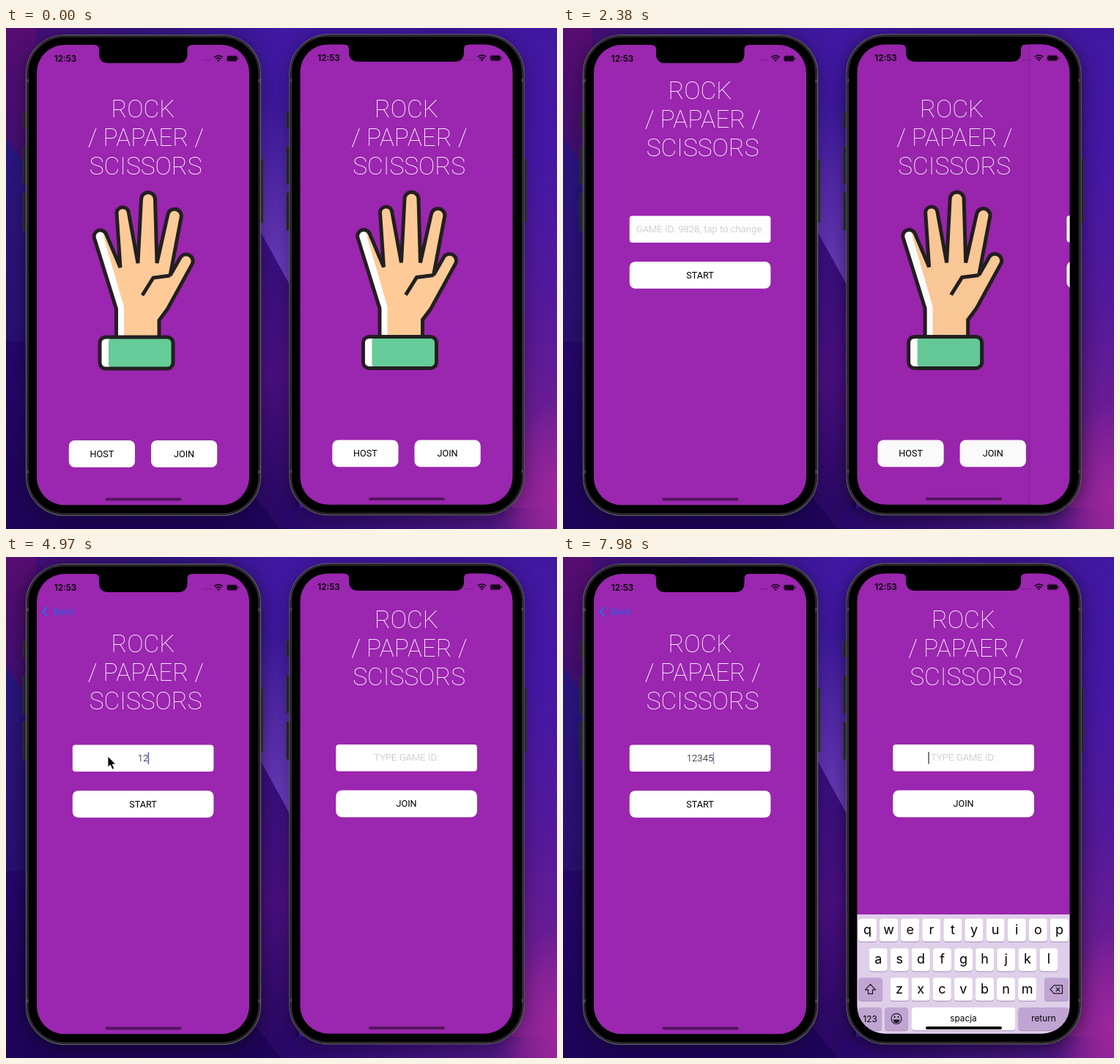
An HTML page that plays this animation: 752x684 px, repeating every 8 s.

```html
<!DOCTYPE html>
<html lang="en">
<head>
<meta charset="utf-8">
<title>Rock / Paper / Scissors</title>
<style>
html, body { margin: 0; width: 100%; height: 100%; overflow: hidden; background: #240a62; }
svg { display: block; width: 752px; height: 684px; font-family: Roboto, "Noto Sans", sans-serif; }
text { text-anchor: middle; white-space: pre; }
.title { font-size: 33.5px; font-weight: 100; fill: #fff; }
.label { font-size: 12.65px; }
.field { font-size: 13.2px; font-weight: 300; }
.hint { fill: #bdbdc2; }
.clock { font: 600 11.7px Inter, Roboto, sans-serif; }
.back { font: 400 12.2px Inter, Roboto, sans-serif; fill: #2264ea; text-anchor: start; }
.letter { font: 400 18px Inter, Roboto, sans-serif; }
.key { font: 400 11.8px Inter, Roboto, sans-serif; }
.ink { fill: none; stroke: #231f20; stroke-width: 5; }
.icon { fill: none; stroke: #1a1420; stroke-width: 1.2; stroke-linejoin: round; stroke-linecap: round; }
</style>
</head>
<body>
<svg id="stage" viewBox="0 0 752 684"></svg>
<script>
const LOOP = 8000, STEP = 70, WIDTH = 290;
const PURPLE = '#9b26af';
const HAND = 'M150.5 423V383.5L120.4 286.5A8.6 8.6 0 0 1 136.6 281L156 327L151 252A8.3 8.3 0 0 1 167 250' +
  'L180 321L184.5 234A9.5 9.5 0 0 1 203.5 234L206 321L221 254A9.3 9.3 0 0 1 239 259' +
  'L224 338L238.2 313A9.2 9.2 0 0 1 253.4 323.5L220.5 383.5L209 399V423';

const rect = (x, y, w, h, r, fill, more = '') =>
  `<rect x="${x}" y="${y}" width="${w}" height="${h}" rx="${r}" fill="${fill}" ${more}/>`;
const text = (cls, x, y, s, more = '') => `<text class="${cls}" x="${x}" y="${y}" ${more}>${s}</text>`;
const poly = (points, fill) => `<polygon points="${points}" fill="${fill}"/>`;
const path = (d, more) => `<path d="${d}" ${more}/>`;
const gradient = (id, dir, ...stops) => `<linearGradient id="${id}" ${dir}>` +
  stops.map(([o, c, a = 1]) => `<stop offset="${o}" stop-color="${c}" stop-opacity="${a}"/>`).join('') +
  '</linearGradient>';

const defs = `<defs>
  ${gradient('sky', '', [0, '#470d74'], [.25, '#33157f'], [.5, '#4018a2'], [.8, '#3d169a'], [1, '#4417a0'])}
  ${gradient('dusk', 'x2="0" y2="1"', [0, '#560d70'], [1, '#3d0f70'])}
  ${gradient('slope', 'x2="0" y2="1"', [0, '#2a1680'], [1, '#28106e'])}
  ${gradient('facet', 'x2="0" y2="1"', [0, '#3d189c'], [1, '#7040bd'])}
  ${gradient('low', 'x2="0" y2="1"', [0, '#25076a'], [1, '#1e0457'])}
  ${gradient('mid', 'x2="0" y2="1"', [0, '#35107f'], [.5, '#4a1080'], [1, '#260862'])}
  ${gradient('side', 'x2="0" y2="1"', [0, '#4217a0'], [.25, '#4417a4'], [.55, '#53199a'], [.8, '#6d1d92'], [1, '#82208f'])}
  ${gradient('floor', '', [0, '#28086a'], [.75, '#4a1680'], [1, '#82208f'])}
  ${gradient('edge', '', [0, '#000', 0], [1, '#000', .07])}
  <radialGradient id="glow"><stop stop-color="#9c279c"/><stop offset="1" stop-color="#9c279c" stop-opacity="0"/></radialGradient>
  <filter id="blur" x="-30%" y="-30%" width="160%" height="160%"><feGaussianBlur stdDeviation="13"/></filter>
  <clipPath id="screen">${rect(42, 23, WIDTH, 628.3, 38, '#000')}</clipPath>
  <clipPath id="skin">${path(HAND, '')}</clipPath>
</defs>`;

const wallpaper =
  rect(0, 0, 752, 684, 0, 'url(#sky)') +
  poly('0,0 40,0 40,205 0,150', 'url(#dusk)') +
  poly('0,150 40,205 40,442 0,428', 'url(#slope)') +
  poly('0,428 400,440 400,684 0,684', 'url(#low)') +
  poly('340,100 395,100 395,365 340,265', 'url(#facet)') +
  poly('340,265 395,365 395,684 375,684 340,640', 'url(#mid)') +
  rect(690, 0, 62, 684, 0, 'url(#side)') +
  rect(380, 655, 372, 29, 0, 'url(#floor)') +
  '<ellipse cx="752" cy="640" rx="75" ry="130" fill="url(#glow)"/>';

const title = y => text('title', 187, y, 'ROCK') +
  text('title', 190.8, y + 39, '/ PAPAER /') + text('title', 190.6, y + 78, 'SCISSORS');

const hand = path(HAND, 'fill="#fecb98"') +
  `<g clip-path="url(#skin)">${poly('110,270 130,270 134,288 161,381 161,425 145,425 145,384', '#fff')}</g>` +
  path(HAND, 'class="ink" stroke-miterlimit="2"') +
  path('M224 338L201 341L186 365', 'class="ink"') +
  rect(128, 422, 100, 43, 8, '#fff') + rect(140, 423, 87, 41, 5, '#66cc99') +
  rect(128, 422, 100, 43, 8, 'none', 'stroke="#231f20" stroke-width="5"');

const backdrop = rect(41, 22, WIDTH + 2, 631, 0, PURPLE);
const button = (x, y, w, label) => rect(x, y, w, 36.8, 8, '#fff') +
  text('label', x + w / 2, y + 23, label);

const home = backdrop + title(122.3) + hand +
  button(85.8, 563, 90.2, 'HOST') + button(198, 563, 90.2, 'JOIN');

const form = (id, hint, action) => backdrop +
  rect(35, 22, 6, 631, 0, 'url(#edge)') +
  `<g id="${id}Title">${title(97.3)}</g>` +
  rect(90.8, 256.5, 192.6, 36.5, 4, '#fff') +
  text('field hint', 187, 279, hint, `id="${id}Hint"`) +
  text('field', 187, 279, '', `id="${id}Value"`) +
  button(90.8, 319, 192.6, action) +
  `<g id="${id}Back" visibility="hidden">` +
  path('M56.5 68L50.5 74.5L56.5 81', 'fill="none" stroke="#0a7aff" stroke-width="1.8"') +
  text('back', 64.5, 79, 'Back') + '</g>' +
  rect(-.7, 266.5, 1.4, 16.5, .5, id === 'host' ? '#4b50d8' : '#4a4650', `id="${id}Caret" opacity="0"`);

const status = text('clock', 81, 45.5, '12:53') +
  [269, 272.3, 275.6, 278.9].map(x => rect(x - 1, 43, 1.8, 1.8, .9, '#6d1c7c')).join('') +
  path('M284.3 40Q290 35.3 295.7 40M286.4 42.4Q290 39.4 293.6 42.4', 'fill="none" stroke="#16061a" stroke-width="1.7"') +
  path('M288 44Q290 42.4 292 44L290 46.2Z', 'fill="#16061a"') +
  rect(301.5, 38, 14, 7.4, 2.2, '#16061a', 'stroke="#5c1a68" stroke-width=".8"') +
  rect(316.6, 40.3, 1.3, 2.8, .6, '#3a1042');

const notch = (a, b, y) => path(
  `M${a - 7} 22H${b + 7}V23Q${b} 23 ${b} 29V${y - 13}Q${b} ${y} ${b - 13} ${y}H${a + 13}` +
  `Q${a} ${y} ${a} ${y - 13}V29Q${a} 23 ${a - 7} 23Z`, 'fill="#000"');

function keyboard() {
  const cap = (x, y, w, fill = '#fff') => rect(x, y + 1, w, 31.2, 4, '#a68db8') + rect(x, y, w, 31.2, 4, fill);
  const dark = '#c0a5d2';
  const row = (letters, x, y) => [...letters].map((c, i) => {
    const cx = x + i * 29.1;
    return cap(cx - 12.5, y, 25) + text('letter', cx, y + 21, c);
  }).join('');
  return rect(41, 488.6, 293, 165, 0, '#dfcfe9') +
    row('qwertyuiop', 56, 494.4) + row('asdfghjkl', 70.7, 534.8) + row('zxcvbnm', 99.6, 575.2) +
    cap(43.6, 575.2, 33, dark) + cap(297.5, 575.2, 33, dark) +
    path('M60 584L67 591.5H63V597H57V591.5H53Z', 'class="icon"') +
    path('M305.5 591L310.5 585.5H322V596.5H310.5ZM313.5 588.5L318.5 593.5M318.5 588.5L313.5 593.5', 'class="icon"') +
    cap(43.6, 615.6, 32, dark) + text('key', 59.6, 635.3, '123') +
    cap(79.6, 615.6, 32, dark) +
    '<circle cx="95.6" cy="631" r="7" class="icon"/>' +
    path('M91 632H100.2Q99.5 636.5 95.6 636.5T91 632Z', 'fill="#1a1420"') +
    '<circle cx="93.2" cy="628.6" r="1.1"/><circle cx="98" cy="628.6" r="1.1"/>' +
    cap(116.5, 615.6, 141.5) + text('key', 187, 634.5, 'spacja') +
    cap(262, 615.6, 69, dark) + text('key', 296.5, 634.5, 'return');
}

function phone(id, x, y, screen, notchShape, extra = '') {
  const side = (bx, by, h) => rect(bx, by, 5, h, 1.5, '#252328', 'stroke="#3c3a40" stroke-width=".6"');
  const ticks = [[28, 70], [28, 604], [344, 70], [344, 604]]
    .map(([a, b]) => rect(a, b, 3, 4, 0, '#454347')).join('');
  return `<g transform="translate(${x} ${y})">` +
    rect(27, 14, 320, 656, 54, '#000', `id="${id}Shadow" filter="url(#blur)"`) +
    side(23, 115, 22) + side(23, 162, 52) + side(23, 225, 52) + side(346, 179, 87) +
    rect(27.5, 9.5, 320, 656, 53, '#000', 'stroke="#666468" stroke-width="1.2"') +
    rect(29.4, 11.4, 316.2, 652.2, 51, '#000', 'stroke="#29282b" stroke-width="2.6"') + ticks +
    `<g clip-path="url(#screen)"><g id="${id}Home">${home}</g>` +
    rect(41, 22, WIDTH + 2, 631, 0, '#000', `id="${id}Dim" opacity="0"`) +
    `<g id="${id}Form">${screen}</g>${status}${extra}` +
    rect(135.5, 641.5, 104, 4, 2, '#000', `id="${id}Bar"`) + '</g>' + notchShape + '</g>';
}

document.getElementById('stage').innerHTML = defs + wallpaper +
  phone('host', 0, 0, form('host', 'GAME ID: 9828, tap to change.', 'START'), notch(127, 247.5, 48)) +
  phone('join', 359.5, -.6, form('join', 'TYPE GAME ID:', 'JOIN'), notch(108.5, 265.5, 46.6),
    `<g id="keys">${keyboard()}</g>`) +
  path('M139 272V287L142.5 284L145 290L147.8 288.8L145.2 283H149.8Z',
    'id="mouse" fill="#000" stroke="#fff" stroke-width=".9"');

const $ = id => document.getElementById(id);
const set = (id, name, value) => $(id).setAttribute(name, value);
const show = (id, on) => set(id, 'visibility', on ? 'visible' : 'hidden');
const move = (id, x, y) => set(id, 'transform', `translate(${x.toFixed(2)} ${y.toFixed(2)})`);

// Critically damped spring, 0 to 1.
function spring(age, rate) {
  if (age <= 0) return 0;
  const left = (1 + age * rate) * Math.exp(-age * rate);
  return left < .004 ? 1 : 1 - left;
}

function push(id, age) {
  const p = spring(age, .0189);
  move(id + 'Form', WIDTH * (1 - p) + (p ? 0 : 10), 0);
  move(id + 'Home', -.3 * WIDTH * p, 0);
  set(id + 'Dim', 'opacity', .1 * p);
  show(id + 'Home', p < 1);
  show(id + 'Dim', p < 1);
}

function blink(age) {
  const a = age - 630;
  if (a < 0) return 1;
  if (a > 950) return .65;
  return a < 350 ? Math.max(0, .5 - a / 140) : Math.min(1, .3 + (a - 350) / 200);
}

const FOCUS = 3360, TYPED = [4690, 4970, 5320, 5600, 6370];

function draw(t) {
  push('host', t - 799);
  push('join', t - 2339);

  const n = TYPED.filter(k => t >= k).length;
  $('hostValue').textContent = '12345'.slice(0, n);
  show('hostHint', !n);
  show('hostBack', n);
  move('hostTitle', 0, n ? 33 : 0);
  move('hostCaret', n ? 187 + n * 3.7 : 98.3, 0);
  set('hostCaret', 'opacity', t < FOCUS ? 0 : blink(t - (n ? TYPED[n - 1] : FOCUS - STEP)));
  show('mouse', t >= 3640 && t < 7070);

  const up = spring(t - 7780, .04);
  move('keys', 0, 166 * (1 - up));
  move('joinCaret', 139.6, 0);
  set('joinCaret', 'opacity', up ? 1 : 0);
  set('hostBar', 'opacity', .45);
  set('joinBar', 'opacity', up > .5 ? 1 : .45);

  const right = (t >= 2240 && t < 3150) || t >= 7700;
  set('hostShadow', 'opacity', t >= 700 && !right ? .55 : .35);
  set('joinShadow', 'opacity', right ? .55 : .35);
}

let start;
function frame(now) {
  start ??= now;
  const t = (now - start) % LOOP;
  draw(Math.floor(t / STEP + .001) * STEP);
  requestAnimationFrame(frame);
}
draw(0);
requestAnimationFrame(frame);
</script>
</body>
</html>
```
